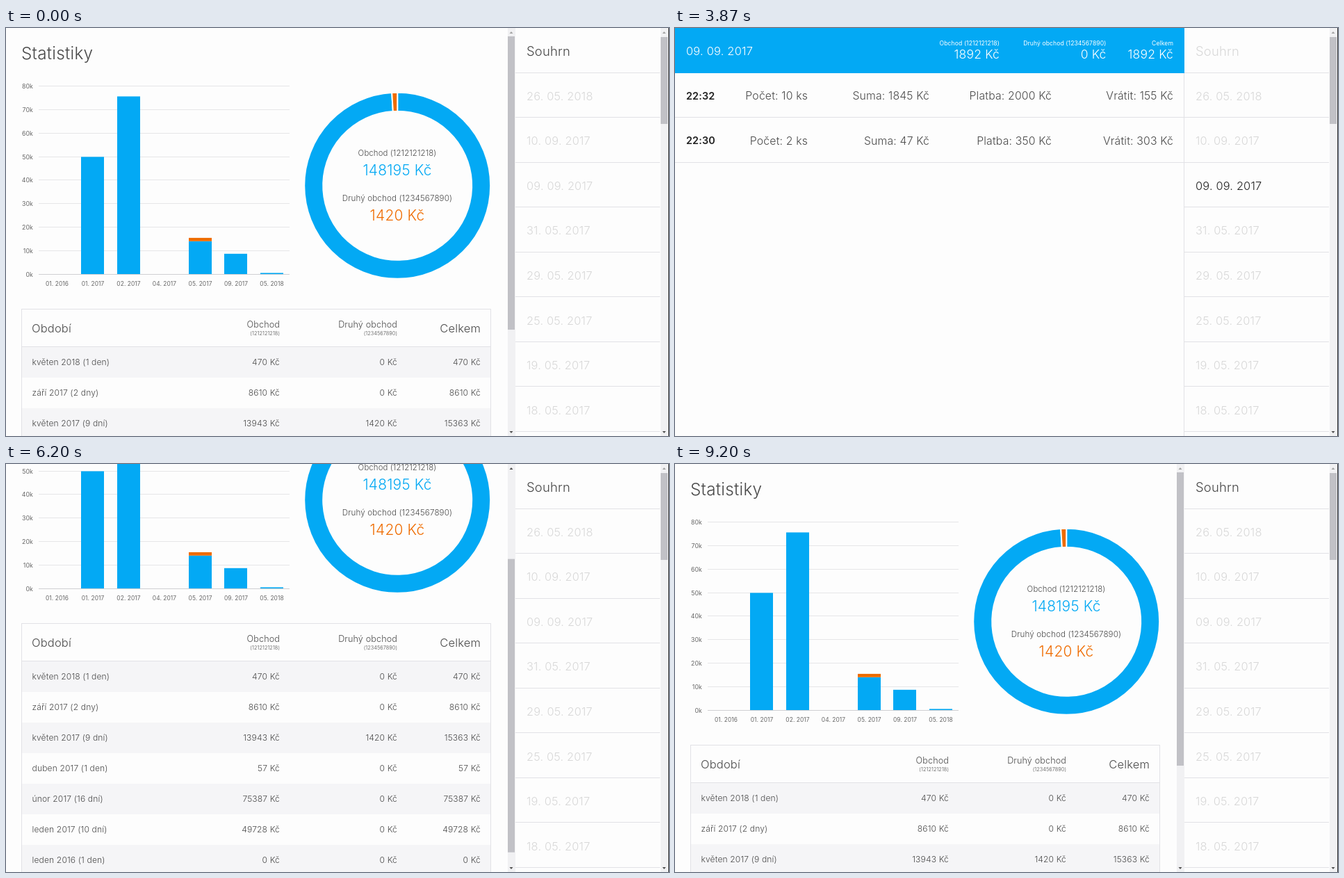
An HTML page with a canvas that plays this animation: 954x587 px, repeating every 9230 ms.

```html
<!DOCTYPE html>
<html lang="cs">
<head>
<meta charset="utf-8">
<title>Statistiky</title>
<style>
html, body { margin: 0; width: 100%; height: 100%; overflow: hidden; background: #fdfdfd; }
canvas { display: block; width: 954px; height: 587px; }
</style>
</head>
<body>
<canvas id="stage"></canvas>
<script>
const W = 954, H = 587, LOOP = 9230;
const BLUE = '#03a9f4', ORANGE = '#ef6c00', PAPER = '#fdfdfd';
const INK = '#4a4a4a', RULE = '#e2e2e6', STRIPE = '#f5f5f7';
const SHOP = '(1212121218)', SHOP2 = '(1234567890)';

const canvas = document.getElementById('stage');
const dpr = window.devicePixelRatio || 1;
canvas.width = W * dpr;
canvas.height = H * dpr;
const ctx = canvas.getContext('2d');

const months = [
  { tick: '01. 2016', name: 'leden 2016 (1 den)', a: 0, b: 0 },
  { tick: '01. 2017', name: 'leden 2017 (10 dní)', a: 49728, b: 0 },
  { tick: '02. 2017', name: 'únor 2017 (16 dní)', a: 75387, b: 0 },
  { tick: '04. 2017', name: 'duben 2017 (1 den)', a: 57, b: 0 },
  { tick: '05. 2017', name: 'květen 2017 (9 dní)', a: 13943, b: 1420 },
  { tick: '09. 2017', name: 'září 2017 (2 dny)', a: 8610, b: 0 },
  { tick: '05. 2018', name: 'květen 2018 (1 den)', a: 470, b: 0 }
];
const sumA = months.reduce((s, m) => s + m.a, 0);
const sumB = months.reduce((s, m) => s + m.b, 0);

const menu = ['Souhrn', '26. 05. 2018', '10. 09. 2017', '09. 09. 2017', '31. 05. 2017',
  '29. 05. 2017', '25. 05. 2017', '19. 05. 2017', '18. 05. 2017'];

// Sales per day: time, pieces, sum, paid
const days = {
  1: [['14:06', 4, 470, 500]],
  2: [['18:41', 12, 4868, 5000], ['18:37', 5, 1850, 2000]],
  3: [['22:32', 10, 1845, 2000], ['22:30', 2, 47, 350]]
};

// Moments when a menu item becomes active
const visits = [[0, 0], [1900, 1], [2690, 2], [3230, 3], [3930, 0]];
const FADE = 220;
const chartStart = 3880, chartTime = 1000;
const scrollKeys = [[5730, 0], [5970, 83], [6260, 198], [6500, 198], [6670, 142.5], [7130, 0]];

const clamp = v => Math.max(0, Math.min(1, v));
const smooth = v => v * v * (3 - 2 * v);
const money = v => v + ' Kč';

function text(str, x, y, size, color = INK, align = 'left', weight = 300) {
  ctx.font = `${weight} ${size}px Inter, "Open Sans", sans-serif`;
  ctx.letterSpacing = (0.01 * size).toFixed(2) + 'px';
  ctx.textAlign = align;
  ctx.fillStyle = color;
  ctx.fillText(str, x, y + size * 0.36);
}

function rect(x, y, w, h, color) {
  ctx.fillStyle = color;
  ctx.fillRect(x, y, w, h);
}

function arrow(x, y, dir, color) {
  ctx.fillStyle = color;
  ctx.beginPath();
  ctx.moveTo(x - 2.5, y + dir * 1.5);
  ctx.lineTo(x + 2.5, y + dir * 1.5);
  ctx.lineTo(x, y - dir * 1.5);
  ctx.fill();
}

function scrollbar(x, top, length, atTop) {
  rect(x, 0, 11, H, '#f1f1f3');
  rect(x, top, 10, length, '#c1c1c6');
  arrow(x + 5, 6.5, 1, atTop ? '#a3a3a3' : '#505050');
  arrow(x + 5, 581.5, -1, '#505050');
}

function barChart(grow) {
  const base = 354, perUnit = 271.2 / 80000, step = 51.5;
  for (let k = 0; k <= 80; k += 10) {
    const y = Math.round(354 - k * 1000 * perUnit);
    rect(47, y, 361, 1, k ? '#e6e6e8' : '#cfcfd2');
    text(k + 'k', 39, y + 0.5, 8.8, '#666', 'right', 400);
  }
  months.forEach((m, i) => {
    const x = 73.5 + i * step, left = Math.round(x - 17);
    const ha = Math.max(m.a * perUnit, 1.5) * grow, hb = m.b * perUnit * grow;
    if (m.a > 100) rect(left, base - ha, 33, ha, BLUE);
    if (m.b) rect(left, base - ha - hb, 33, hb, ORANGE);
    text(m.tick, x, 367.5, 8.4, '#666', 'center', 400);
  });
}

function slice(from, to, color) {
  ctx.beginPath();
  ctx.arc(563.2, 226.8, 134, from, to);
  ctx.arc(563.2, 226.8, 107, to, from, true);
  ctx.closePath();
  ctx.fillStyle = color;
  ctx.fill();
  ctx.strokeStyle = PAPER;
  ctx.lineWidth = 2;
  ctx.stroke();
}

function donut(grow) {
  const turn = Math.PI * 2 * grow, start = -Math.PI / 2;
  const split = start + turn * sumA / (sumA + sumB);
  slice(start, split, BLUE);
  slice(split, start + turn, ORANGE);
  text('Obchod ' + SHOP, 563, 180, 11.4, INK, 'center');
  text(money(sumA), 563, 204, 20.9, BLUE, 'center');
  text('Druhý obchod ' + SHOP2, 563, 244.5, 11.6, INK, 'center');
  text(money(sumB), 563, 269, 20.9, ORANGE, 'center');
}

function table() {
  const top = 405, head = 54, row = 44, rows = months.slice().reverse();
  text('Období', 37, 432.5, 16.5);
  text('Obchod', 394, 426.5, 12.6, INK, 'right');
  text(SHOP, 394, 439, 7.3, INK, 'right');
  text('Druhý obchod', 563, 426.5, 12.6, INK, 'right');
  text(SHOP2, 563, 439, 7.3, INK, 'right');
  text('Celkem', 683, 432.5, 16.5, INK, 'right');
  rows.forEach((m, i) => {
    const y = top + head + i * row, mid = y + 22;
    if (i % 2 === 0) rect(23, y, 675, row, STRIPE);
    text(m.name, 37.5, mid, 12.1);
    text(money(m.a), 394, mid, 12.1, INK, 'right');
    text(money(m.b), 563, mid, 12.1, INK, 'right');
    text(money(m.a + m.b), 683, mid, 12.1, INK, 'right');
  });
  rect(22, top + head - 1, 676, 1, RULE);
  ctx.strokeStyle = RULE;
  ctx.lineWidth = 1;
  ctx.strokeRect(22.5, top - 0.5, 675, head + row * rows.length);
}

function scrollAt(t) {
  for (let i = 1; i < scrollKeys.length; i++) {
    const [t0, v0] = scrollKeys[i - 1], [t1, v1] = scrollKeys[i];
    if (t < t1) return v0 + (v1 - v0) * clamp((t - t0) / (t1 - t0));
  }
  return 0;
}

function summary(t) {
  const p = t < 1900 ? 1 : clamp((t - chartStart) / chartTime);
  const grow = 1 - Math.pow(1 - p, 4);
  const offset = scrollAt(t);
  ctx.save();
  ctx.translate(0, -Math.round(offset));
  text('Statistiky', 22, 36.5, 24.3);
  barChart(grow);
  donut(grow);
  table();
  ctx.restore();
  scrollbar(722, 12 + offset * 0.714, 422, offset < 0.5);
}

function dayView(index) {
  const sales = days[index];
  const total = sales.reduce((s, r) => s + r[2], 0);
  rect(0, 0, 733, 65, BLUE);
  text(menu[index], 16, 33, 16.5, '#fff');
  [['Obchod ' + SHOP, total, 467], ['Druhý obchod ' + SHOP2, 0, 620.5], ['Celkem', total, 717]]
    .forEach(([label, value, x]) => {
      text(label, x, 21.5, 8.6, '#fff', 'right', 400);
      text(money(value), x, 38, 17.5, '#fff', 'right');
    });
  sales.forEach(([time, count, sum, paid], i) => {
    const y = 97.5 + i * 64.5;
    text(time, 16, y, 14.4, '#222', 'left', 600);
    text(`Počet: ${count} ks`, 191, y, 15.8, INK, 'right');
    text('Suma: ' + money(sum), 366, y, 15.8, INK, 'right');
    text('Platba: ' + money(paid), 542, y, 15.8, INK, 'right');
    text('Vrátit: ' + money(paid - sum), 717, y, 15.8, INK, 'right');
    rect(0, Math.round(128 + i * 64.6), 733, 1, RULE);
  });
}

function sidebar(t, visit) {
  const now = visits[visit][1];
  const before = visit ? visits[visit - 1][1] : now;
  const mix = smooth(clamp((t - visits[visit][0]) / FADE));
  rect(732, 0, 1, H, RULE);
  menu.forEach((label, i) => {
    const on = i === now ? (before === now ? 1 : mix) : i === before ? 1 - mix : 0;
    const shade = Math.round(216 - on * (i ? 182 : 146));
    text(label, 749, 33 + i * 64.6, i ? 16.4 : 18.4, `rgb(${shade},${shade},${shade})`);
    rect(733, Math.round(63.5 + i * 64.57), 208, 1, RULE);
  });
  scrollbar(942, 13, 125, true);
  rect(953, 0, 1, H, '#333');
}

function draw(t) {
  let visit = 0;
  while (visit + 1 < visits.length && t >= visits[visit + 1][0]) visit++;
  ctx.setTransform(dpr, 0, 0, dpr, 0, 0);
  rect(0, 0, W, H, PAPER);
  sidebar(t, visit);
  const page = visits[visit][1];
  if (page) dayView(page);
  else summary(t);
}

const begin = performance.now();
function frame() {
  draw((performance.now() - begin) % LOOP);
  requestAnimationFrame(frame);
}
draw(0);
requestAnimationFrame(frame);
</script>
</body>
</html>
```
